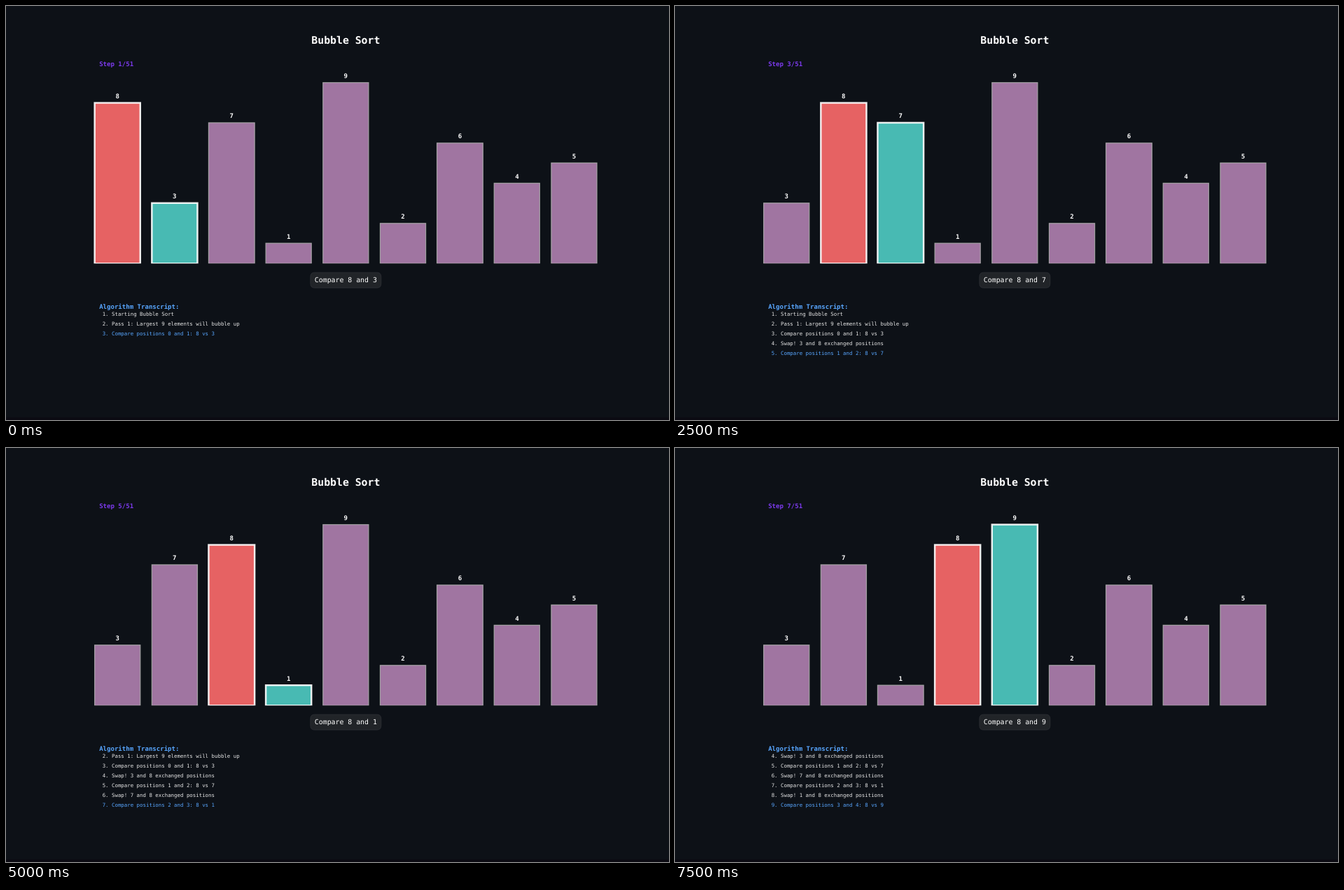
These frames come from a looping animation (947x592 px, 8 s). An HTML page with a canvas:

```html
<!DOCTYPE html>
<html lang="en">
<head>
<meta charset="utf-8">
<title>Bubble Sort</title>
<style>
html, body { margin: 0; width: 100%; height: 100%; overflow: hidden; background: #0d1117; }
canvas { display: block; }
</style>
</head>
<body>
<canvas id="stage" width="947" height="592"></canvas>
<script>
const ctx = document.getElementById('stage').getContext('2d');
const LOOP = 8000, STEP = 1250, TOTAL_STEPS = 51, MAX_LINES = 6;
const START = [8, 3, 7, 1, 9, 2, 6, 4, 5];

// Layout on a 1600 x 1000 figure, scaled down to the stage.
const PT = 100 / 72;
const AXES = { left: 200, width: 1240, top: 120, bottom: 622 };
const CENTER = AXES.left + AXES.width / 2;
const PITCH = AXES.width / START.length;
const UNIT = 502.17 / 10.35;
const TEXT_X = 225;

const BLUE = '#58a6ff';
const PLAIN = '#a075a1';
const COMPARE = ['#e66263', '#48bab3'];
const SWAP = ['#e6824b', '#e66090'];

// Walks through the sort and records one state per comparison or swap.
function buildSteps(count) {
  const values = [...START];
  const log = ['Starting Bubble Sort', `Pass 1: Largest ${values.length} elements will bubble up`];
  const steps = [];
  const record = (i, colors, status, line) => {
    log.push(line);
    steps.push({ values: [...values], i, colors, status, log: [...log] });
  };
  for (let i = 0; steps.length < count; i++) {
    const [a, b] = [values[i], values[i + 1]];
    record(i, COMPARE, `Compare ${a} and ${b}`, `Compare positions ${i} and ${i + 1}: ${a} vs ${b}`);
    if (a > b) {
      [values[i], values[i + 1]] = [b, a];
      record(i, SWAP, `SWAP: ${b} <-> ${a}`, `Swap! ${b} and ${a} exchanged positions`);
    }
  }
  return steps;
}

const steps = buildSteps(Math.ceil(LOOP / STEP));

function text(str, x, y, points, color, { bold = false, align = 'left' } = {}) {
  ctx.font = `${bold ? 'bold ' : ''}${points * PT}px "DejaVu Sans Mono", monospace`;
  ctx.textRendering = 'geometricPrecision';
  ctx.textAlign = align;
  ctx.fillStyle = color;
  ctx.fillText(str, x, y);
}

function drawBar(value, index, color) {
  const left = Math.round(AXES.left + (index + 0.1) * PITCH);
  const right = Math.round(AXES.left + (index + 0.9) * PITCH);
  const top = Math.round(AXES.bottom - value * UNIT);
  const box = [left, top, right - left, AXES.bottom - top];

  ctx.save();
  ctx.beginPath();
  ctx.rect(AXES.left, AXES.top, AXES.width, AXES.bottom - AXES.top);
  ctx.clip();
  ctx.fillStyle = color || PLAIN;
  ctx.fillRect(...box);
  ctx.globalAlpha = 0.9;
  ctx.lineWidth = (color ? 3 : 1.5) * PT;
  ctx.strokeStyle = color ? '#fff' : '#aaa';
  ctx.strokeRect(...box);
  ctx.restore();

  text(value, AXES.left + (index + 0.5) * PITCH, top - 11, 11, '#fff', { bold: true, align: 'center' });
}

function drawStatus(str) {
  const y = 662.3, pad = 10;
  ctx.font = `${12 * PT}px "DejaVu Sans Mono", monospace`;
  ctx.textRendering = 'geometricPrecision';
  const halfWidth = ctx.measureText(str).width / 2 + pad;
  const [x0, x1, y0, y1] = [CENTER - halfWidth, CENTER + halfWidth, y - 18.5, y + 18.5];

  ctx.beginPath();
  ctx.moveTo(x0 + pad, y0);
  ctx.lineTo(x1 - pad, y0);
  ctx.quadraticCurveTo(x1, y0, x1, y0 + pad);
  ctx.lineTo(x1, y1 - pad);
  ctx.quadraticCurveTo(x1, y1, x1 - pad, y1);
  ctx.lineTo(x0 + pad, y1);
  ctx.quadraticCurveTo(x0, y1, x0, y1 - pad);
  ctx.lineTo(x0, y0 + pad);
  ctx.quadraticCurveTo(x0, y0, x0 + pad, y0);
  ctx.closePath();
  ctx.fillStyle = '#212428';
  ctx.fill();
  ctx.lineWidth = PT;
  ctx.strokeStyle = '#303337';
  ctx.stroke();

  text(str, CENTER, 667, 12, '#fff', { align: 'center' });
}

function drawTranscript(log) {
  text('Algorithm Transcript:', TEXT_X, 732, 11, BLUE, { bold: true });
  const first = Math.max(0, log.length - MAX_LINES);
  log.slice(first).forEach((line, row) => {
    const number = first + row + 1;
    const color = number === log.length ? BLUE : '#e6e6e6';
    text(`${String(number).padStart(2)}. ${line}`, TEXT_X, Math.round(748.9 + row * 23.44), 9, color);
  });
}

function draw(index) {
  const { values, i, colors, status, log } = steps[index];
  ctx.setTransform(947 / 1600, 0, 0, 592 / 1000, 0, 0);
  ctx.fillStyle = '#0d1117';
  ctx.fillRect(0, 0, 1600, 1000);
  ctx.fillStyle = '#0b0a12';
  ctx.fillRect(0, 994, 1600, 6);

  text('Bubble Sort', CENTER, 92, 18, '#fff', { bold: true, align: 'center' });
  text(`Step ${index + 1}/${TOTAL_STEPS}`, TEXT_X, 146, 11, '#7c3aed', { bold: true });
  values.forEach((value, n) => drawBar(value, n, colors[n - i]));
  drawStatus(status);
  drawTranscript(log);
}

const start = performance.now();
function frame() {
  const time = (performance.now() - start) % LOOP;
  draw(Math.floor(time / STEP));
  requestAnimationFrame(frame);
}
frame();
</script>
</body>
</html>
```
